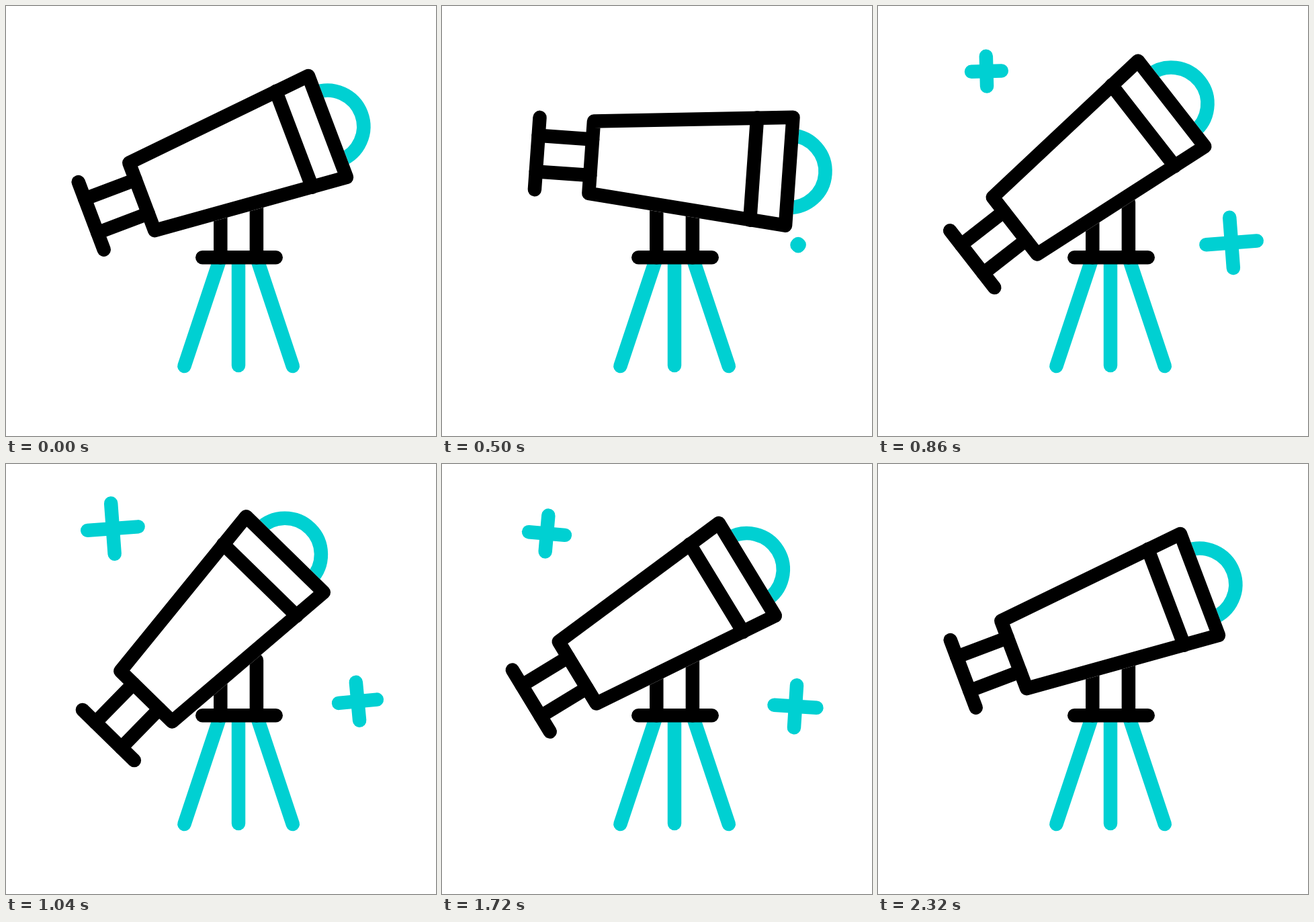
An HTML page with a canvas for the animation above (2.4 s loop, 640 by 640 pixels).

```html
<!DOCTYPE html>
<html lang="en">
<head>
<meta charset="utf-8">
<title>Telescope</title>
<style>
  html, body { margin: 0; width: 100%; height: 100%; overflow: hidden; background: #fff; }
  canvas { display: block; width: 640px; height: 640px; }
</style>
</head>
<body>
<canvas id="stage" width="640" height="640"></canvas>
<script>
const ctx = document.getElementById('stage').getContext('2d');
const LOOP = 2400, STEP = 20, LINE = 20.5;
const BLACK = '#000', CYAN = '#00d0d2', WHITE = '#fff';
const RAD = Math.PI / 180;

// Key lists are [time, value] pairs, eased between neighbours.
const TILT = [[0, -20.7], [474, 4.3], [1005, -45.7], [2320, -20.7]];
const ARM = [[440, 0], [855, 37.8], [1105, 27], [1570, 27], [1900, 37.8], [2130, 0]];
const TWIST = [[440, 0], [1043, -5.3], [1497, 5], [2130, 0]];
const STARS = [
  { x: 526, y: 356.6, delay: 0 },
  { x: 158.7, y: 100.3, delay: 190 }
];

// Symmetric ease-in-out, cubic-bezier(.42, 0, .58, 1)
function ease(x) {
  let lo = 0, hi = 1;
  for (let i = 0; i < 24; i++) {
    const s = (lo + hi) / 2, r = 1 - s;
    if (1.26 * s * r * r + 1.74 * s * s * r + s * s * s < x) lo = s;
    else hi = s;
  }
  return lo * lo * (3 - 2 * lo);
}

function valueAt(keys, t) {
  if (t <= keys[0][0]) return keys[0][1];
  for (let i = 1; i < keys.length; i++) {
    const [t0, a] = keys[i - 1], [t1, b] = keys[i];
    if (t < t1) return a + (b - a) * ease((t - t0) / (t1 - t0));
  }
  return keys[keys.length - 1][1];
}

function line(color, x1, y1, x2, y2) {
  ctx.strokeStyle = color;
  ctx.beginPath();
  ctx.moveTo(x1, y1);
  ctx.lineTo(x2, y2);
  ctx.stroke();
}

function drawStar({ x, y, delay }, time) {
  const t = time - delay;
  if (t <= ARM[0][0] || t >= ARM[ARM.length - 1][0]) return;
  const arm = valueAt(ARM, t);
  const orbit = -0.21 * (t - 435) * RAD;
  ctx.save();
  ctx.translate(x + 4.2 * Math.cos(orbit), y + 4.2 * Math.sin(orbit));
  ctx.rotate(valueAt(TWIST, t) * RAD);
  line(CYAN, -arm, 0, arm, 0);
  line(CYAN, 0, -arm, 0, arm);
  ctx.restore();
}

function drawStand() {
  line(CYAN, 319.3, 374.3, 265.4, 536);
  line(CYAN, 346, 374.3, 346, 535);
  line(CYAN, 372.9, 374.3, 426.8, 536);
  line(BLACK, 319.3, 292, 319.3, 374.3);
  line(BLACK, 372.9, 292, 372.9, 374.3);
  line(BLACK, 292.3, 374.3, 401.7, 374.3);
}

function drawTelescope(time) {
  const unit = 26.9, eye = -209, back = -128.3, front = 167, ring = 113.8;
  ctx.save();
  ctx.translate(345.5, 300);
  ctx.rotate(valueAt(TILT, time) * RAD);
  ctx.translate(0, -65.8);

  ctx.lineCap = 'butt';
  ctx.strokeStyle = CYAN;
  ctx.beginPath();
  ctx.arc(front, 0, 2 * unit, -Math.PI / 2, Math.PI / 2);
  ctx.stroke();
  ctx.lineCap = 'round';

  ctx.beginPath();
  ctx.moveTo(back, -2 * unit);
  ctx.lineTo(front, -3 * unit);
  ctx.lineTo(front, 3 * unit);
  ctx.lineTo(back, 2 * unit);
  ctx.closePath();
  // The white pass hides the posts behind the barrel.
  ctx.fillStyle = WHITE;
  ctx.fill();
  for (const color of [WHITE, BLACK]) {
    ctx.strokeStyle = color;
    ctx.stroke();
  }

  line(BLACK, ring, -76.4, ring, 76.4);
  line(BLACK, eye, -2 * unit, eye, 2 * unit);
  line(BLACK, eye, -unit, back, -unit);
  line(BLACK, eye, unit, back, unit);
  ctx.restore();
}

function draw(time) {
  ctx.fillStyle = WHITE;
  ctx.fillRect(0, 0, 640, 640);
  ctx.lineWidth = LINE;
  ctx.lineCap = ctx.lineJoin = 'round';
  STARS.forEach(star => drawStar(star, time));
  drawStand();
  drawTelescope(time);
}

const start = performance.now();
function tick() {
  const time = (performance.now() - start) % LOOP;
  draw(Math.floor(time / STEP) * STEP);
  requestAnimationFrame(tick);
}
tick();
</script>
</body>
</html>
```
